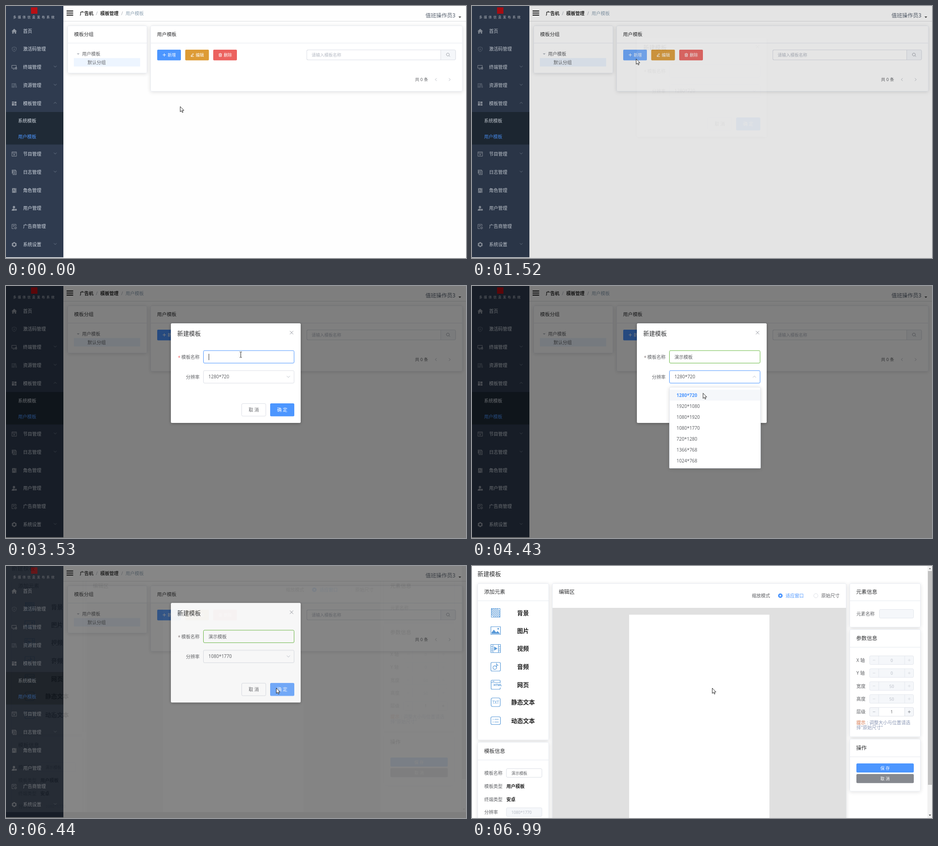
Animation, 1010 px wide and 554 px high, one loop 8000 ms. Source, as an HTML page with a canvas:

```html
<!DOCTYPE html>
<html lang="zh-CN">
<head>
<meta charset="utf-8">
<title>新建模板</title>
<style>
html, body { margin: 0; width: 100%; height: 100%; overflow: hidden; background: #fff; }
canvas { display: block; width: 1010px; height: 554px; }
</style>
</head>
<body>
<canvas id="stage" width="1010" height="554"></canvas>
<script>
const W = 1010, H = 554, LOOP = 8000;
const FONT = '"Noto Sans", "Noto Sans CJK SC", "Noto Sans CJK", sans-serif';
const BLUE = '#4c96ff', BLUE_HOT = '#70abff', GREEN = '#67b93f';
const LINE = '#dcdfe6', PALE = '#e6e9ef', TEXT = '#606266', DARK = '#303133', HINT = '#b4b9c3';

const stage = document.getElementById('stage').getContext('2d');
const bufCanvas = document.createElement('canvas');
bufCanvas.width = W; bufCanvas.height = H;
const buf = bufCanvas.getContext('2d');
let g = stage;

// drawing helpers
function txt(s, x, cy, size = 10, color = TEXT, o = {}) {
  g.font = `${o.weight || 400} ${size}px ${FONT}`;
  g.textAlign = o.align || 'left';
  g.letterSpacing = (o.gap || 0) + 'px';
  g.fillStyle = color;
  g.fillText(s, x, cy + size * 0.37);
}
function rect(x, y, w, h, color) {
  g.fillStyle = color;
  g.fillRect(x, y, w, h);
}
function box(x, y, w, h, fill, border, r = 2.5) {
  g.beginPath();
  g.roundRect(border ? x + .5 : x, border ? y + .5 : y, border ? w - 1 : w, border ? h - 1 : h, r);
  if (fill) { g.fillStyle = fill; g.fill(); }
  if (border) { g.strokeStyle = border; g.lineWidth = 1; g.stroke(); }
}
function shadowBox(x, y, w, h, alpha = .12, blur = 8) {
  g.save();
  g.shadowColor = `rgba(0,0,0,${alpha})`;
  g.shadowBlur = blur;
  g.shadowOffsetY = 1.5;
  box(x, y, w, h, '#fff', null);
  g.restore();
}
function card(x, y, w, h, title, size, head) {
  shadowBox(x, y, w, h);
  box(x, y, w, h, '#fff', '#e9ecf2');
  rect(x + 1, y + head, w - 2, 1, PALE);
  txt(title, x + 14.5, y + head / 2, size, DARK);
}
function path(d, x, y, o) {
  g.save();
  g.translate(x, y);
  const p = new Path2D(d);
  if (o.fill) { g.fillStyle = o.fill; g.fill(p, 'evenodd'); }
  if (o.stroke) { g.strokeStyle = o.stroke; g.lineWidth = o.lw || 1; g.stroke(p); }
  g.restore();
}
function dot(x, y, r, fill, border) {
  g.beginPath();
  g.arc(x, y, r, 0, 7);
  if (fill) { g.fillStyle = fill; g.fill(); }
  if (border) { g.strokeStyle = border; g.lineWidth = 1; g.stroke(); }
}
function chevron(x, y, angle, color, size = 3) {
  g.save();
  g.translate(x, y);
  g.rotate(angle);
  path(`M${-size} ${-size / 2}L0 ${size / 2}L${size} ${-size / 2}`, 0, 0, { stroke: color, lw: .9 });
  g.restore();
}
function layer(draw, alpha, dy) {
  if (alpha <= 0) return;
  buf.clearRect(0, 0, W, H);
  g = buf;
  draw();
  g = stage;
  g.globalAlpha = Math.min(1, alpha);
  g.drawImage(bufCanvas, 0, dy);
  g.globalAlpha = 1;
}

// timing helpers
function bezier(x1, y1, x2, y2) {
  const at = (a, b, u) => 3 * a * u * (1 - u) ** 2 + 3 * b * u * u * (1 - u) + u ** 3;
  return x => {
    if (x <= 0) return 0;
    if (x >= 1) return 1;
    let lo = 0, hi = 1;
    for (let i = 0; i < 24; i++) {
      const m = (lo + hi) / 2;
      if (at(x1, x2, m) < x) lo = m; else hi = m;
    }
    return at(y1, y2, lo);
  };
}
const ease = bezier(.25, .1, .25, 1), easeDrop = bezier(.23, 1, .32, 1);
const TICK = 75, BASES = [0, 1361, 3740, 5210, 6360];
function snap(t) {
  const b = BASES.filter(v => v <= t).pop();
  return b + Math.floor((t - b) / TICK) * TICK;
}
const fade = (t, start, dur, f = ease) => f((snap(t) - start) / dur);
function stepped(t, a, b, n) {
  if (t < a) return 0;
  if (t >= b) return 1;
  return (Math.floor((t - a) / (b - a) * (n - 1)) + 1) / n;
}

// pointer: start, end, steps, bend x, bend y, target x, target y
const MOVES = [
  [210, 990, 11, 510, 150, 355, 119],
  [1060, 1130, 2, 356, 115, 360, 116],
  [2210, 2590, 6, 430, 190, 515, 151],
  [3600, 3600, 1, 514, 190, 513, 213],
  [3740, 4510, 10, 520, 150, 506, 240],
  [4580, 4810, 4, 512, 280, 512, 312],
  [5435, 5900, 7, 570, 300, 593, 268],
  [6510, 6990, 7, 560, 262, 527, 268]
];
function pointer(t) {
  let x = 382, y = 220.5;
  for (const [a, b, n, bx, by, ex, ey] of MOVES) {
    const p = stepped(t, a, b, n);
    if (!p) break;
    const s = p * p * (3 - 2 * p), q = 1 - s;
    x = q * q * x + 2 * q * s * bx + s * s * ex;
    y = q * q * y + 2 * q * s * by + s * s * ey;
  }
  return { x, y };
}
const inside = (p, x, y, w, h) => p.x >= x && p.x < x + w && p.y >= y && p.y < y + h;

// sidebar
const ICON = '#8f96a1', DIM = '#5d6878';
const MENU = [
  ['首页', 55, 0, { fill: ICON }, 'M0 6L6 .5 12 6H10.3V11.3H7.3V8H4.7V11.3H1.7V6Z'],
  ['激活码管理', 94.5, 0, { stroke: DIM }, 'M6 1L10.5 2.5V6.5Q10 9.8 6 11.3Q2 9.8 1.5 6.5V2.5ZM6 4V7.5M4.7 6.4L6 7.7 7.3 6.4'],
  ['终端管理', 134, 1, { stroke: ICON }, 'M.7 2H10.5V8.3H.7ZM3 10.5H7M8.5 6.5H11.5V10.5H8.5Z'],
  ['资源管理', 174, 1, { stroke: DIM, lw: 1.2 }, 'M1 2H3.6V10.5H1ZM3.6 2H6.4V10.5H3.6ZM7.2 2.4L9.2 2 11.4 10 9.4 10.6ZM1 8.5H6.4'],
  ['模板管理', 214, 2, { fill: ICON }, 'M1 1.5H5.5V4H1ZM6.5 1.5H11V6H6.5ZM1 5H5.5V10.5H1ZM6.5 7H11V10.5H6.5Z'],
  ['节目管理', 325, 1, { stroke: ICON }, 'M1 1.2H11V10.8H1ZM1 3.6H11M5 5.6V8.8L7.6 7.2Z'],
  ['日志管理', 365, 1, { stroke: ICON, lw: 1.1 }, 'M3.5 3H10.5V11.3H3.5ZM1.5 9V1H9V3M5 5.3H9M5 7.3H9M5 9.3H9M1 3H3M1 5H3M1 7H3'],
  ['角色管理', 405, 0, { fill: ICON }, 'M1.5 1H9V11H1.5ZM3 8.5H4L5.2 3.5 6.5 8.5H7.5L5.8 2.8H4.7ZM9.8 1H11V11H9.8Z'],
  ['用户管理', 444.5, 0, { fill: ICON }, 'M5.5 0.5A2.7 2.7 0 1 1 5.4 .5ZM.5 11Q.5 6.5 5 6.5Q6.5 6.5 7.2 7.2V11ZM9.7 6.8A2.2 2.2 0 1 1 9.6 6.8Z'],
  ['广告商管理', 484.5, 0, { stroke: ICON }, 'M10 5V1H1V10.5H5.5M3 3.5H8M3 6H6M9 6.5A2.3 2.3 0 1 1 8.9 6.5M7.5 10.3L10.5 7.4'],
  ['系统设置', 524, 1, { fill: ICON }, 'M4.6 .5H7.4L8 2.2 9.8 2 11.6 4.5 10.6 6 11.6 7.5 9.8 10 8 9.8 7.4 11.5H4.6L4 9.8 2.2 10 .4 7.5 1.4 6 .4 4.5 2.2 2 4 2.2ZM6 3.6A2.4 2.4 0 1 0 6.1 3.6Z']
];
function sidebar() {
  rect(0, 0, 126, 552.5, '#2f3b4f');
  rect(0, 233, 126, 71.5, '#1f2a36');
  rect(55, 3, 14, 14, '#b80f14');
  txt('多媒体信息发布系统', 15.5, 24, 7, '#c3c8d0', { gap: 3.5 });
  for (const [name, y, arrow, style, d] of MENU) {
    path(d, 12, y - 5.5, style);
    txt(name, 37.5, y, 10, '#d3dae3');
    if (arrow) chevron(108, y - 1, arrow === 2 ? Math.PI : 0, '#748091');
  }
  txt('系统模板', 26.5, 252, 10, '#d3dae3');
  txt('用户模板', 26.5, 287, 10, BLUE);
}

function button(x, label, color, d) {
  box(x, 96, 52, 23.5, color, null, 2);
  path(d, x + 11.5, 103.5, { stroke: '#fff' });
  txt(label, x + 23, 107.7, 9, '#fff', { weight: 500 });
}
function home(t, p) {
  const hot = (x, a, b) => t < 2210 && inside(p, x, 96, 52, 23.5) ? b : a;
  rect(0, 0, W, H, '#fefefe');
  sidebar();
  for (const y of [10, 14.5, 19]) rect(133, y, 14.5, 2, '#111');
  txt('广告机', 162, 16.5, 10, '#222', { weight: 700 });
  txt('/', 197.5, 16.5, 10, '#a5abb5');
  txt('模板管理', 207, 16.5, 10, '#222', { weight: 700 });
  txt('/', 253, 16.5, 10, '#a5abb5');
  txt('用户模板', 262.5, 16.5, 10, '#8fa3b4');
  txt('值班操作员3', 921, 20.5, 11.8, '#56606e');
  path('M-3 -1.5H3L0 1.7Z', 996.5, 24.5, { fill: '#444' });
  rect(126, 33, W - 126, 1, '#dcdddf');

  card(135, 43, 175, 105, '模板分组', 10.7, 38);
  path('M-3 -1.5H3L0 1.7Z', 158.5, 105.5, { fill: '#b6bac2' });
  txt('用户模板', 167, 105, 10);
  rect(149, 114.5, 145.5, 18.5, '#edf5ff');
  txt('默认分组', 179, 124, 10);

  card(317, 43, 685.5, 145, '用户模板', 10.7, 38);
  button(332, '新增', hot(332, BLUE, BLUE_HOT), 'M4 .5V7.5M.5 4H7.5');
  button(393.5, '编辑', hot(393.5, '#dd9b35', '#e6b162'), 'M1 7.5H7.5M1.5 5.5L5.5 .8 7 2.2 3 6.5 1.3 7Z');
  button(455, '删除', hot(455, '#ec625f', '#f08683'), 'M.5 1.8H7.5M3 .5H5M1.5 2V7.5H6.5V2M3.3 3.5V6M4.8 3.5V6');
  box(660, 96, 327.5, 23, '#fff', LINE);
  rect(954, 96.5, 33, 22, '#f5f7fa');
  box(660, 96, 327.5, 23, null, LINE);
  rect(954, 96, 1, 23, LINE);
  txt('请输入模板名称', 671, 107.7, 9.3, HINT);
  path('M3.2 0A3.2 3.2 0 1 1 3.1 0M5.5 5.5L7.8 7.8', 967, 103.5, { stroke: '#90959e', lw: .9 });
  txt('共 0 条', 898, 161.7, 9.3);
  chevron(944, 161.7, Math.PI / 2, '#adb1b9');
  chevron(974, 161.7, -Math.PI / 2, '#adb1b9');
}

// dialog
const FOCUS = 2514, PASTE = 3600, OPEN = 3965, PICK = 5210, BLUR = 6050;
const SIZES = ['1280*720', '1920*1080', '1080*1920', '1080*1770', '720*1280', '1366*768', '1024*768'];
function dialog(t, p) {
  shadowBox(362, 82, 285, 219, .3, 6);
  txt('新建模板', 376, 104, 12.9, DARK);
  path('M-3.7 -3.7L3.7 3.7M3.7 -3.7L-3.7 3.7', 627, 102.5, { stroke: '#90949c' });
  txt('*', 377.5, 157, 10, t >= 2590 && t < 3740 ? '#f56c6c' : '#8c8080');
  txt('模板名称', 425, 156, 10, TEXT, { align: 'right' });
  txt('分辨率', 425, 200, 10, TEXT, { align: 'right' });

  box(433, 141.5, 200, 28.5, '#fff', t < FOCUS ? LINE : t < OPEN ? BLUE : GREEN);
  if (t >= PASTE) txt('演示模板', 444.5, 156, 10);
  if ((t >= FOCUS && t < 2980) || (t >= 3530 && t < OPEN)) rect(t < PASTE ? 445 : 486, 149, 1, 14, '#333');

  box(433, 185.5, 200, 28.5, '#fff', t >= OPEN && t < BLUR ? BLUE : LINE);
  txt(SIZES[t < PICK ? 0 : 3], 444.5, 199.7, 10);
  const turn = fade(t, OPEN, 300) - fade(t, 5270, 300);
  chevron(620, 199.5, -Math.PI * turn, '#b4b9c3', 3.5);

  box(517, 258, 54, 28.5, '#fff', LINE);
  txt('取 消', 544, 272.3, 10, TEXT, { align: 'center', weight: 500 });
  box(580, 258, 53, 28.5, inside(p, 580, 258, 53, 28.5) && t > 5300 ? BLUE_HOT : BLUE, null);
  txt('确 定', 606.5, 272.3, 10, '#fff', { align: 'center', weight: 500 });
}
function dropdown(p) {
  shadowBox(433, 222, 201, 179, .14);
  box(433, 222, 201, 179, '#fff', '#e4e7ed');
  SIZES.forEach((s, i) => {
    const y = 228 + i * 24;
    if (inside(p, 433, y, 201, 24)) rect(434, y, 199, 24, '#f5f7fa');
    txt(s, 449, y + 12, 10, i ? TEXT : BLUE, { weight: i ? 400 : 700 });
  });
}

// editor page
const TINT = '#5a9ad8';
const PARTS = [
  ['背景', 103, 'M-9.5 -9.5H9.5V9.5H-9.5ZM-9 -5L5 9M-9 -1L1 9M-9 3L-3 9M-9 -9L9 9M-5 -9L9 5M-1 -9L9 1M3 -9L9 -3'],
  ['图片', 142, 'M-10.5 -8.5H10.5V8.5H-10.5Z'],
  ['视频', 181.5, 'M-10.5 -9H10.5V9H-10.5ZM-6 -9V9M6 -9V9M-10 -4H-6M-10 1H-6M-10 5H-6M6 -4H10M6 1H10M6 5H10'],
  ['音频', 221.5, 'M-8 -9.5H8Q10.5 -9.5 10.5 -7V7Q10.5 9.5 8 9.5H-8Q-10.5 9.5 -10.5 7V-7Q-10.5 -9.5 -8 -9.5ZM2 2A4 4 0 1 1 1.9 1M2 2V-6Q3 -3 6 -3'],
  ['网页', 261, 'M10 -4V-8Q10 -10 8 -10H-8Q-10 -10 -10 -8V8Q-10 10 -8 10H8Q10 10 10 8V6M-10 -5H10M-7 -7.5H-3'],
  ['静态文本', 299.5, 'M-6 -9.5H6Q10 -9.5 10 -6V6Q10 9.5 6 9.5H-6Q-10 9.5 -10 6V-6Q-10 -9.5 -6 -9.5Z'],
  ['动态文本', 340, 'M-7 -8.5H7Q10.5 -8.5 10.5 -6V6Q10.5 8.5 7 8.5H-7Q-10.5 8.5 -10.5 6V-6Q-10.5 -8.5 -7 -8.5ZM-6.5 -3H-4.5M-2.5 -3H6.5M-6.5 3H-4.5M-2.5 3H6.5']
];
function stepper(label, y, value, on) {
  txt(label, 844, y, 10);
  const edge = on ? LINE : '#e4e7ed', ink = on ? '#777b83' : '#c8ccd4';
  box(872.5, y - 10, 97.5, 20, '#f5f7fa', edge);
  if (on) rect(893, y - 9, 57, 18, '#fff');
  rect(892.5, y - 9.5, 1, 19, edge);
  rect(949.5, y - 9.5, 1, 19, edge);
  rect(880, y - .5, 5.5, 1, on ? '#b9bdc5' : '#d6d9df');
  path('M-3 0H3M0 -3V3', 960, y, { stroke: on ? ink : '#d6d9df', lw: .9 });
  txt(value, 921.5, y + .5, 9, on ? TEXT : '#b9bec7', { align: 'center' });
}
function editor() {
  rect(0, 0, W, H, '#fff');
  txt('新建模板', 12, 17.5, 12.9, DARK);

  card(12, 38, 157, 345, '添加元素', 11.6, 38);
  for (const [name, y, d] of PARTS) {
    path(d, 52, y, { stroke: TINT, lw: 1.2 });
    txt(name, 112, y, 13, '#222', { weight: 700, align: 'center' });
  }
  path('M-9 7V4L-4 -2 1 4 4 1 9 6V7Z', 52, 142, { fill: TINT });
  dot(57.5, 138, 1.8, TINT);
  path('M-3.5 -4.5L4 0 -3.5 4.5Z', 52, 181.5, { fill: TINT });
  txt('HTML', 56.5, 262, 6.5, TINT, { weight: 700, align: 'center' });
  txt('TXT', 52, 299.5, 8.5, TINT, { align: 'center' });

  card(12, 387, 157, 190, '模板信息', 11.6, 39);
  ['模板名称', '模板类型', '终端类型', '分辨率'].forEach((s, i) => txt(s, 27, 455.3 + i * 28.8, 10));
  box(75, 445, 79, 20, '#fff', LINE);
  txt('演示模板', 86.5, 455.5, 8.7);
  txt('用户模板', 75.5, 484.3, 10, '#222', { weight: 700 });
  txt('安卓', 75.5, 513, 10, '#222', { weight: 700 });
  box(75, 531, 79, 20, '#f5f7fa', '#e4e7ed');
  txt('1080*1770', 86.5, 541.5, 8.7, HINT);

  card(176, 38, 646, 540, '编辑区', 11.6, 38);
  rect(177, 74, 644, 18, '#fff');
  rect(176.5, 92, 645, H - 92, '#e0e0e0');
  rect(345, 107, 308, H - 107, '#fff');
  txt('缩放模式', 614.5, 65, 10);
  dot(677, 65.3, 5, BLUE);
  dot(677, 65.3, 1.7, '#fff');
  txt('适应窗口', 688.5, 65, 10, BLUE);
  dot(755, 65.3, 4.6, '#fff', LINE);
  txt('原始尺寸', 767, 65, 10);

  card(829, 38, 156, 97, '元素信息', 11.6, 38);
  txt('元素名称', 844, 105, 10);
  box(894, 95, 76, 20, '#f5f7fa', '#e4e7ed');

  card(829, 139, 156, 237, '参数信息', 11.6, 39);
  [['X 轴', '0'], ['Y 轴', '0'], ['宽度', '50'], ['高度', '50'], ['层级', '1']]
    .forEach(([s, v], i) => stepper(s, 207 + i * 28.4, v, i === 4));
  txt('提示', 844, 344.5, 10, '#d2683a');
  txt(':', 867, 344.5, 10, '#8a97b5');
  txt('调整大小与位置请选', 872.5, 344.5, 10, '#8a97b5');
  txt('择"原始尺寸"', 844, 355.5, 10, '#8a97b5');

  card(829, 380, 156, 115.5, '操作', 11.6, 39);
  box(844, 434, 126, 20, BLUE, null);
  box(844, 457.3, 126, 20, '#86898f', null);
  txt('保 存', 907, 444.3, 9, '#fff', { align: 'center', weight: 500 });
  txt('取 消', 907, 467.6, 9, '#fff', { align: 'center', weight: 500 });

  rect(1000, 0, 10, H, '#f1f1f1');
  rect(1001, 11, 9, 470, '#c1c1c1');
  path('M-2.5 1.5H2.5L0 -1.5Z', 1005.5, 5.5, { fill: '#777' });
  path('M-2.5 -1.5H2.5L0 1.5Z', 1005.5, 548, { fill: '#444' });
}

function cursor(t, p) {
  if (t >= 2210 && t < PASTE && inside(p, 433, 141, 200, 29)) {
    path('M-2.5 -6H-.8L0 -5.3 .8 -6H2.5M0 -5.3V5.3M-2.5 6H-.8L0 5.3 .8 6H2.5', p.x + .5, p.y, { stroke: '#222' });
  } else {
    path('M0 0V11.6L2.7 9.1 4.5 13.2 6.3 12.4 4.6 8.5H8.2Z', p.x + .5, p.y + .5, { fill: '#fff', stroke: '#111', lw: .9 });
  }
}

function render(t) {
  const p = pointer(t), shown = fade(t, 1491, 250), left = fade(t, 6415, 250);
  g = stage;
  g.globalAlpha = 1;
  home(t, p);
  const dim = .5 * fade(t, 1479, 200);
  if (dim) rect(0, 0, W, H, `rgba(0,0,0,${dim})`);
  layer(editor, left, -14 * (1 - left));
  const seen = shown * (1 - left);
  layer(() => dialog(t, p), seen, -14 * (1 - seen));
  const drop = fade(t, OPEN, 300, easeDrop) * (1 - fade(t, 5270, 300, easeDrop));
  if (drop > 0) {
    g.save();
    g.beginPath();
    g.translate(0, 222 * (1 - drop));
    g.scale(1, drop);
    g.globalAlpha = drop;
    dropdown(p);
    g.restore();
  }
  cursor(t, p);
}

const began = performance.now();
function tick() {
  render((performance.now() - began) % LOOP);
  requestAnimationFrame(tick);
}
tick();
</script>
</body>
</html>
```
